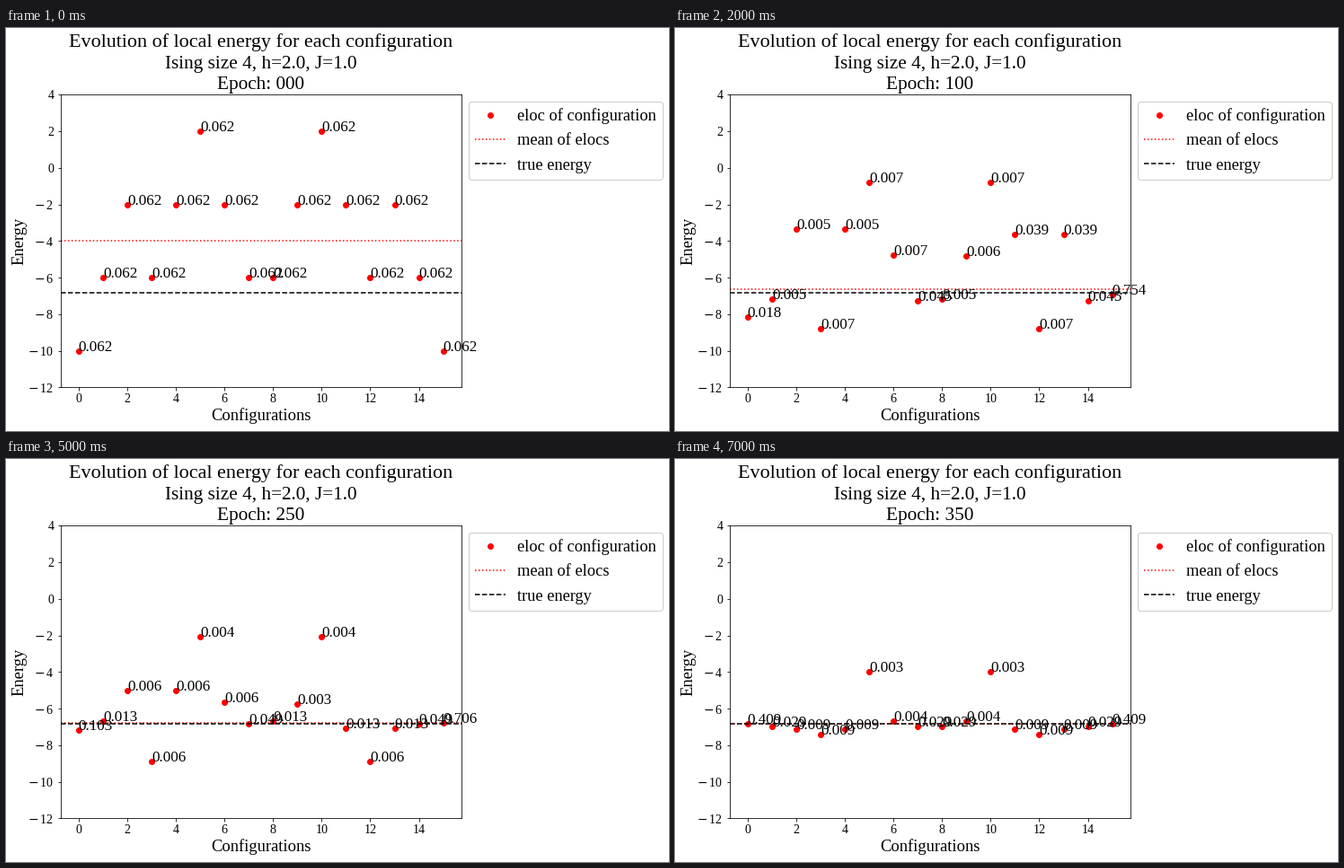
Write a matplotlib script that moves like this. It is 738 px wide and 449 px high and loops after 8000 ms.

```python
import numpy as np
import matplotlib.pyplot as plt
from matplotlib.animation import FuncAnimation
from matplotlib.patches import FancyBboxPatch

W, H, DPI = 738, 449, 72
LEFT, TOP, AX_W, AX_H = 60.55, 74.2, 446.4, 326.16
STEPS, EPOCHS_PER_STEP = 8, 50
TRUE_ENERGY = -6.85

plt.rcParams.update({"font.family": "Liberation Serif",
                     "mathtext.fontset": "dejavuserif"})

# The 16 configurations of an open chain of four spins
configs = np.arange(16)
s0, s1, s2, s3 = spins = [2 * (configs >> k & 1) - 1 for k in range(4)]
total = sum(spins)
ends = s0 + s3 - s1 - s2
pairing = s0 * s1 + s2 * s3 - 0.3 * (s0 * s2 + s1 * s3)
bonds = -2 * (s0 * s1 + s1 * s2 + s2 * s3)

# Key points of the training curves
keys = [0, 1, 2, 3, 4, 5, 7]
field_keys = [0, 0.225, 0.537, 0.626, 0.52, 0.277, 0]
order_keys = [0, 0.087, 0.207, 0.248, 0.28, 0.282, 0.292]
edge_keys = [0, 0.006, 0.012, 0.072, 0.1, 0.128, 0.15]


def state(step):
    """Probabilities and local energies of the trial wave function."""
    field, order, edge = (np.interp(step, keys, values)
                          for values in (field_keys, order_keys, edge_keys))
    soft = 1 - total**2 / 120
    log_p = (field + order * total) * total * soft
    log_p -= edge * ends * (total + 2 * field)
    log_p += 0.235 * (step / 7)**4 * pairing
    prob = np.exp(log_p)
    prob /= prob.sum()
    psi = np.sqrt(prob)
    flipped = sum(psi[configs ^ (1 << k)] for k in range(4))
    return prob, bonds - flipped / psi


fig = plt.figure(figsize=(W / DPI, H / DPI), dpi=DPI, facecolor="white")
ax = fig.add_axes([LEFT / W, 1 - (TOP + AX_H) / H, AX_W / W, AX_H / H])
ax.set(xlim=(-0.75, 15.75), ylim=(-12, 4))

x_ticks, y_ticks = range(0, 15, 2), range(-12, 5, 2)
ax.set_xticks(x_ticks, [str(v) for v in x_ticks])
ax.set_yticks(y_ticks, [rf"$-\,${-v}" if v < 0 else str(v) for v in y_ticks])
ax.tick_params(labelsize=14)

dots, = ax.plot(configs, configs * 0, "ro")
mean_line = ax.axhline(0, color="red", ls=":")
ax.axhline(TRUE_ENERGY, color="black", ls="--")
labels = [ax.text(c, 0, "", size=17, zorder=5) for c in configs]

# Pixel-space layer for titles and legend
page = fig.add_axes([0, 0, 1, 1])
page.set(xlim=(0, W), ylim=(H, 0))
page.axis("off")

mid_x, mid_y = LEFT + AX_W / 2, TOP + AX_H / 2


def centred(y, text, size):
    return page.text(mid_x, y, text, size=size, ha="center", va="baseline")


centred(21, "Evolution of local energy for each configuration", 22.1)
centred(44.5, "Ising size 4, h=2.0, J=1.0", 21.2)
epoch = centred(68, "", 21.2)
centred(437, "Configurations", 18.5)
page.text(19.5, mid_y, "Energy", size=18.5, rotation=90,
          rotation_mode="anchor", ha="center", va="baseline")

page.add_patch(FancyBboxPatch(
    (515, 81.8), 215.6, 87, boxstyle="round,pad=0,rounding_size=3.4",
    fc="white", ec="0.8", lw=1, snap=True))
page.plot([538.6], [97], "ro")
page.plot([521.8, 555.8], [124.2, 124.2], "r:")
page.plot([521.8, 555.8], [151.4, 151.4], "k--")
for row, text in enumerate(("eloc of configuration",
                            "mean of elocs",
                            "true energy")):
    page.text(569.2, 102.8 + 27.4 * row, text, size=18.4, va="baseline")


def draw(step):
    prob, energy = state(step)
    dots.set_ydata(energy)
    mean_line.set_ydata([prob @ energy] * 2)
    for label, level, p in zip(labels, energy, prob):
        label.set_y(level)
        label.set_text(f"{p:.3f}")
    epoch.set_text(f"Epoch: {step * EPOCHS_PER_STEP:03d}")
    return [dots, mean_line, epoch, *labels]


anim = FuncAnimation(fig, draw, frames=STEPS, interval=1000, repeat=True)
plt.show()
```
